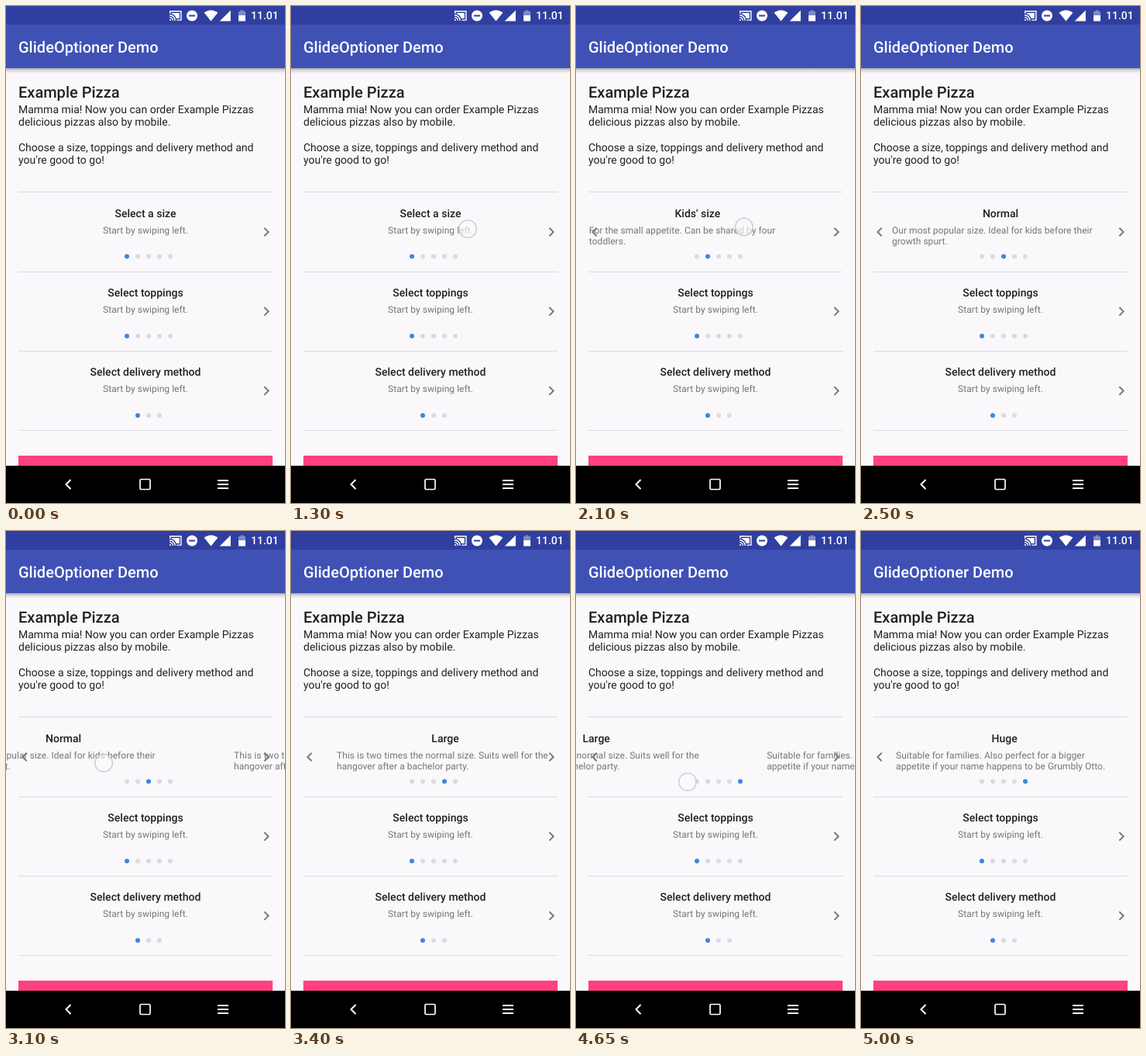
Write an HTML page that moves like this. It is 360 by 640 pixels and loops after 5050 ms.

```html
<!DOCTYPE html>
<html lang="en">
<head>
<meta charset="utf-8">
<title>Pizza selector</title>
<style>
  html, body { margin: 0; width: 100%; height: 100%; overflow: hidden; background: #faf8fb; }
  svg { display: block; width: 360px; height: 640px; font-family: Roboto, sans-serif; text-rendering: geometricPrecision; }
  .h { font-size: 20px; font-weight: 500; }
  .b { font-size: 14px; fill: #212121; }
  .t { font-size: 14px; font-weight: 500; fill: #212121; text-anchor: middle; }
  .d { font-size: 12px; fill: #757575; letter-spacing: .045px; }
  .mid { text-anchor: middle; }
  .arrow { fill: #7a797c; }
</style>
</head>
<body>
<svg id="stage" viewBox="0 0 360 640">
  <defs>
    <linearGradient id="shade" x2="0" y2="1">
      <stop offset="0" stop-color="#000" stop-opacity=".33"/>
      <stop offset=".4" stop-color="#000" stop-opacity=".13"/>
      <stop offset="1" stop-color="#000" stop-opacity="0"/>
    </linearGradient>
    <path id="next" d="M10 6L8.59 7.41 13.17 12l-4.58 4.59L10 18l6-6z"/>
    <path id="prev" d="M15.41 7.41L14 6l-6 6 6 6 1.41-1.41L10.83 12z"/>
  </defs>
  <rect width="360" height="640" fill="#faf8fb"/>

  <rect y="80" width="360" height="7" fill="url(#shade)"/>
  <rect width="360" height="80" fill="#3f51b5"/>
  <rect width="360" height="24" fill="#303f9f"/>
  <text class="h" x="16" y="60" fill="#fff">GlideOptioner Demo</text>

  <!-- status bar -->
  <g fill="#fff">
    <g transform="translate(210.3 4) scale(.708)">
      <path d="M2 8V4H22V20H14M1 11a10 10 0 0 1 10 10M1 15a6 6 0 0 1 6 6" fill="none" stroke="#fff" stroke-width="2"/>
      <path d="M1 18v3h3a3 3 0 0 0-3-3zM5 7H19V17H13.4A13 13 0 0 0 5 8.600z"/>
    </g>
    <circle cx="240" cy="12.500" r="7"/>
    <rect x="236" y="11.500" width="8" height="2" fill="#303f9f"/>
    <path transform="translate(255.3 4) scale(.708)" d="M13 22L25.600 6.500C25.100 6.100 20.300 2.100 13 2.100S.9 6.100 .4 6.500z"/>
    <path transform="translate(274.300 4) scale(.708)" d="M2 22H22V2z"/>
    <path d="M300 7h2.500V5.500h4V7h2.500V12h-9z" opacity=".4"/>
    <path d="M300 12h9v7.500h-9z"/>
    <text x="316" y="17" font-size="14" font-weight="500">11.01</text>
  </g>

  <text class="h" x="16" y="117.500" fill="#212121">Example Pizza</text>
  <g class="b">
    <text x="16" y="138">Mamma mia! Now you can order Example Pizzas</text>
    <text x="16" y="154.400">delicious pizzas also by mobile.</text>
    <text x="16" y="187.200">Choose a size, toppings and delivery method and</text>
    <text x="16" y="203.400">you're good to go!</text>
  </g>

  <g id="sections"></g>

  <rect x="16" y="579" width="328" height="13" fill="#ff4081"/>
  <rect y="592" width="360" height="48"/>
  <g fill="none" stroke="#fff" stroke-width="2">
    <path d="M83.500 610L77.500 616L83.500 622"/>
    <rect x="173" y="609.500" width="13" height="13" rx="1.500" stroke-width="1.700"/>
    <path d="M273 611h14M273 616h14M273 621h14"/>
  </g>
  <circle id="touch" r="11.300" fill="#fbfafc" fill-opacity=".65" stroke="#c8c6ce" stroke-opacity=".85" stroke-width="1.500"/>
</svg>
<script>
const LOOP = 5050, STEP = 50, WIDTH = 360, SLOP = 8, PITCH = 102.3;
const $ = id => document.getElementById(id);
const clamp = v => Math.max(0, Math.min(1, v));

const hint = ["Start by swiping left."];
const sizes = [
  ["Select a size", hint],
  ["Kids' size", ["For the small appetite. Can be shared by four", "toddlers."]],
  ["Normal", ["Our most popular size. Ideal for kids before their", "growth spurt."]],
  ["Large", ["This is two times the normal size. Suits well for the", "hangover after a bachelor party."]],
  ["Huge", ["Suitable for families. Also perfect for a bigger", "appetite if your name happens to be Grumbly Otto."]]
];
const sections = [
  { pages: sizes, dots: 5 },
  { pages: [["Select toppings", hint]], dots: 5 },
  { pages: [["Select delivery method", hint]], dots: 3 }
];

// down: touch appears, drag..up: finger moves, settle: time the page needs to snap
const swipes = [
  { down: 1300, drag: 1350, up: 1500, settle: 400, x: 228, y: 287, dx: -146, dy: 5, bend: -8 },
  { down: 2000, drag: 2050, up: 2190, settle: 310, x: 248, y: 297, dx: -146, dy: 0, bend: -20 },
  { down: 2800, drag: 2900, up: 3136, settle: 680, x: 240, y: 298, dx: -146, dy: 5, bend: -5 },
  { down: 4350, drag: 4420, up: 4640, settle: 680, x: 290, y: 300, dx: -146, dy: 23, bend: 0 }
];

function pageMarkup([title, lines], i) {
  const single = lines.length === 1;
  const body = lines.map((line, n) =>
    `<text class="d${single ? " mid" : ""}" x="${single ? 180 : 40}" y="${292.5 + n * 14}">${line}</text>`).join("");
  return `<g transform="translate(${i * WIDTH})"><text class="t" x="180" y="271.5">${title}</text>${body}</g>`;
}

// dividers sit on whole pixels
const divider = n =>
  `<rect x="16" y="${Math.round(239.4 + n * PITCH)}" width="328" height="1" fill="#dcdadf"/>`;

function sectionMarkup({ pages, dots }, n) {
  const row = Array.from({ length: dots }, (_, i) =>
    `<circle cx="${184 + (i - (dots - 1) / 2) * 14}" cy="322.6" r="3" fill="${i ? "#dcdae0" : "#3f85e0"}"/>`).join("");
  return `${divider(n)}<g transform="translate(0 ${n * PITCH})">
    <g class="pages">${pages.map(pageMarkup).join("")}</g>
    <g class="dots">${row}</g>
    <use href="#prev" class="arrow prev" x="12" y="279" opacity="0"/>
    <use href="#next" class="arrow next" x="324" y="279"/></g>`;
}

$("sections").innerHTML = sections.map(sectionMarkup).join("") + divider(sections.length);

const pick = selector => document.querySelector(selector);
const strip = pick(".pages"), prev = pick(".prev"), next = pick(".next");
const dots = [...pick(".dots").children];

function draw(t) {
  let scroll = 0, page = 0, alpha = 0;
  for (const s of swipes) {
    if (t < s.down) break;
    const move = clamp((t - s.drag) / (s.up - s.drag)) ** 1.5;
    const pulled = Math.max(0, -s.dx * move - SLOP);
    const snap = 1 - (1 - clamp((t - s.up) / s.settle)) ** 5;
    scroll += pulled + (WIDTH - pulled) * snap;
    if (t >= s.up) page++;
    alpha = 1 - clamp((t - s.up) / 150);
    $("touch").setAttribute("cx", s.x + s.dx * move);
    $("touch").setAttribute("cy", s.y + s.dy * move + s.bend * Math.sin(Math.PI * move));
  }
  $("touch").setAttribute("opacity", alpha);
  strip.setAttribute("transform", `translate(${-scroll})`);
  dots.forEach((dot, i) => dot.setAttribute("fill", i === page ? "#3f85e0" : "#dcdae0"));
  prev.setAttribute("opacity", clamp((t - swipes[0].up) / 120));
  next.setAttribute("opacity", 1 - clamp((t - swipes[3].up) / 120));
}

const start = performance.now();
function tick() {
  const t = (performance.now() - start) % LOOP;
  draw(Math.floor(t / STEP) * STEP);
  requestAnimationFrame(tick);
}
tick();
</script>
</body>
</html>
```
